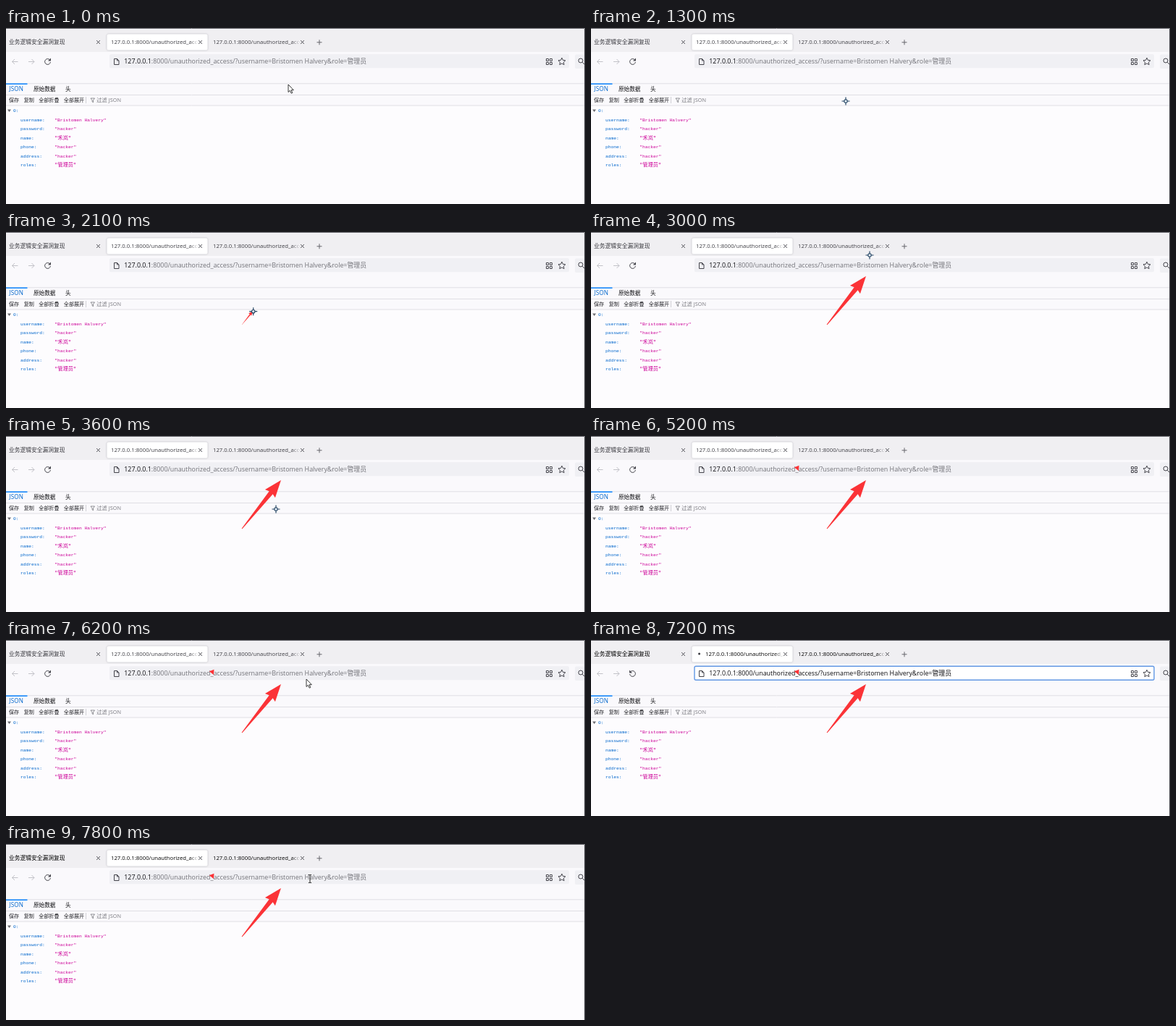
Animation, 800 px wide and 243 px high, one loop 8 s. Source, as an HTML page:

```html
<!DOCTYPE html>
<html lang="zh">
<head>
<meta charset="utf-8">
<style>
  html, body { margin: 0; width: 100%; height: 100%; overflow: hidden; background: #fdfcfe; }
  svg { display: block; width: 800px; height: 243px; }
  text { font-family: "Open Sans", "Noto Sans CJK SC", "Noto Sans CJK", sans-serif; white-space: pre; }
  .tab { font-size: 7.75px; }
  .url { font-size: 8.9px; }
  .tool { font-size: 7.1px; fill: #222226; }
  .json text { font: 6.25px "Liberation Mono", "Noto Sans CJK SC", "Noto Sans CJK", monospace; }
  .key { fill: #0066cc; }
  .value { fill: #cc0098; }
  .line { fill: none; stroke: #45454c; stroke-width: 1; }
</style>
</head>
<body>
<svg viewBox="0 0 800 243">
  <defs>
    <linearGradient id="fade">
      <stop offset=".9" stop-color="#fff"/><stop offset="1" stop-color="#fff" stop-opacity="0"/>
    </linearGradient>
    <mask id="clip1" maskUnits="userSpaceOnUse" x="142" y="8" width="124" height="22">
      <rect x="142" y="8" width="124" height="22" fill="url(#fade)"/>
    </mask>
    <mask id="clip2" maskUnits="userSpaceOnUse" x="283" y="8" width="124" height="22">
      <rect x="283" y="8" width="124" height="22" fill="url(#fade)"/>
    </mask>
    <path id="close" d="M-2.3-2.3 2.3 2.3M2.3-2.3-2.3 2.3" class="line"/>
    <filter id="shadow" x="-5%" y="-30%" width="110%" height="160%">
      <feDropShadow dx="0" dy="0" stdDeviation=".8" flood-color="#606070" flood-opacity=".5"/>
    </filter>
  </defs>

  <!-- tab strip -->
  <rect width="800" height="243" fill="#fdfcfe"/>
  <rect width="800" height="33" fill="#f0eff2"/>
  <rect y="33" width="800" height="44" fill="#faf9fc"/>
  <rect x="139.500" y="8.500" width="139" height="22" rx="2.500" fill="#fff" filter="url(#shadow)"/>
  <g id="tabs" class="tab">
    <text x="4" y="22.300">业务逻辑安全漏洞复现</text>
    <g mask="url(#clip1)"><text id="title" y="22.300">127.0.0.1:8000/unauthorized_access</text></g>
    <g mask="url(#clip2)"><text x="286" y="22.300">127.0.0.1:8000/unauthorized_access</text></g>
  </g>
  <circle id="busy" cy="19" r="1.500" fill="#3a3a40"/>
  <use href="#close" x="127.500" y="19.500"/>
  <use href="#close" x="268.500" y="19.500"/>
  <use href="#close" x="409.500" y="19.500"/>
  <path class="line" d="M429.500 19.800h7M433 16.300v7" style="stroke:#66666c"/>

  <!-- navigation bar -->
  <path class="line" style="stroke:#c2c2c8" d="M16.500 46.500h-8m3.500-3.500-3.500 3.500 3.500 3.500M31 46.500h8m-3.500-3.500 3.500 3.500-3.500 3.500"/>
  <g id="reload">
    <path class="line" d="M60.700 44.200A3.900 3.900 0 1 0 61.400 47"/>
    <path d="M62 41.500v4h-4z" fill="#45454c"/>
  </g>
  <rect id="bar" x="143" y="36.300" width="635" height="19" rx="2" stroke-width="1.400"/>
  <path class="line" d="M149.500 42.500h4l2.500 2.500v5.500h-6.500zM153.500 42.500v2.500h2.500"/>
  <rect id="selection" x="163" y="39.500" width="336" height="13.500" fill="#0078d7"/>
  <text class="url" x="163.300" y="49.200"><tspan id="host">127.0.0.1</tspan><tspan id="path">:8000/unauthorized_access/?username=Bristomen Halvery&amp;role=管理员</tspan></text>
  <path class="line" stroke-width="1.300" d="M746.500 42.500h3v3h-3zM751.500 42.500h3v3h-3zM746.500 47.500h3v3h-3zM751.500 47.500h3v3h-3z"/>
  <path class="line" stroke-linejoin="round" d="M768 41.200l1.500 3.200 3.500.4-2.600 2.400.7 3.500-3.100-1.800-3.100 1.800.7-3.500-2.600-2.400 3.500-.4z"/>
  <rect x="786" y="36.500" width="14" height="19.500" rx="2" fill="#f0f0f4"/>
  <g class="line"><circle cx="794" cy="45" r="3"/><path d="M796.300 47.300l3 3"/></g>

  <!-- viewer toolbars -->
  <rect y="77" width="800" height="30" fill="#faf9fc"/>
  <path d="M0 76.800H800M0 92.500H800M0 107H800" stroke="#e0dfe4"/>
  <rect y="76.500" width="29.500" height="1.500" fill="#0a84ff"/>
  <g font-size="7.600" fill="#0c0c0f">
    <text class="key" x="4.600" y="87.300" font-size="8.200">JSON</text>
    <text x="38" y="87.300">原始数据</text>
    <text x="82" y="87.300">头</text>
  </g>
  <g class="tool">
    <text x="3.900" y="102.200">保存</text>
    <text x="24.700" y="102.200">复制</text>
    <text x="45.200" y="102.200">全部折叠</text>
    <text x="79.800" y="102.200">全部展开</text>
    <text x="125.300" y="102.200" font-size="7.300" fill="#76767c">过滤 JSON</text>
  </g>
  <path d="M110.500 95v9" stroke="#d0d0d5"/>
  <path d="M117 97h5.500l-2 2.700v3l-1.500-1v-2z" fill="none" stroke="#76767c" stroke-width=".8"/>

  <g id="json" class="json">
    <path d="M2 112.500h5l-2.500 3.500z" fill="#6a6a70"/>
    <text class="key" x="10" y="116.300">0:</text>
  </g>
  <path d="M0 .5H799.500V243" fill="none" stroke="#5a5a60"/>

  <!-- annotations: the arrow is drawn along +x from tail to a tip at 86 -->
  <g fill="#fb3337">
    <path id="arrow" d="M0-.5 64-3.200 62-9 86 0 62 9 64 3.200 0 .5z"/>
    <path id="mark" d="M280.800 43.200 287.500 40.800 286.800 48z"/>
  </g>

  <g id="pointer">
    <path data-kind="arrow" d="M0 0V10.500L2.400 8.300 4.200 12.200 5.800 11.500 4.100 7.700H7.300z" fill="#fff" stroke="#222" stroke-width=".9"/>
    <g data-kind="cross" fill="none" stroke="#294866" stroke-width="1.200">
      <circle r="2.200" fill="#e8f2fa"/><path d="M-5.500 0h3.300M2.200 0h3.300M0-5.500v3.300M0 2.200v3.300"/>
    </g>
    <path data-kind="move" d="M0-7 2.800-4H1v3h3V-2.800L7 0 4 2.800V1H1v3h1.800L0 7-2.800 4H-1V1H-4v1.800L-7 0-4-2.800V-1h3V-4h-1.800z" fill="#fff" stroke="#222"/>
    <path data-kind="text" d="M-2-5.500H-.6L0-5 .6-5.500H2M0-5V5M-2 5.500H-.6L0 5 .6 5.500H2" fill="none" stroke="#222"/>
  </g>
</svg>
<script>
const LOOP = 8000, STEP = 100;
const $ = id => document.getElementById(id);
const show = (node, on) => node.setAttribute("display", on ? "inline" : "none");

const record = {
  username: "Bristomen Halvery", password: "hacker", name: "禾岚",
  phone: "hacker", address: "hacker", roles: "管理员"
};

function addText(parent, cls, x, y, content) {
  const node = document.createElementNS("http://www.w3.org/2000/svg", "text");
  node.setAttribute("class", cls);
  node.setAttribute("x", x);
  node.setAttribute("y", y);
  node.textContent = content;
  // Ideographs are wider than the Latin cells.
  if (/[\u4e00-\u9fff]/.test(content)) node.style.fontSize = "7.1px";
  parent.append(node);
}

Object.entries(record).forEach(([key, value], i) => {
  const y = 128.8 + i * 12.5;
  addText($("json"), "key", 20, y, key + ":");
  addText($("json"), "value", 67.3, y, `"${value}"`);
});

// Pointer path: [time, x, y]
const route = [
  [0, 390, 78], [100, 425, 105], [200, 510, 170], [300, 566, 214], [400, 519, 202],
  [900, 519, 202], [1000, 492, 187], [1300, 352, 101], [1800, 330, 134],
  [1900, 326, 128], [2600, 381, 64], [2700, 381, 64], [3000, 385, 32],
  [3200, 392, 36], [3600, 373, 101], [4100, 288, 48], [4200, 288, 48],
  [4300, 291, 51], [4500, 355, 100], [4800, 592, 226], [4900, 600, 260],
  [5800, 470, 260], [5900, 461, 180], [6200, 415, 54], [6400, 415, 54],
  [6500, 417, 54], [6600, 417, 54], [6800, 420, 48], [8000, 420, 48]
];
// Pointer shape from each time on
const shapes = [
  [0, "arrow"], [1000, "cross"], [4300, "move"], [4400, "cross"], [4800, "arrow"],
  [6500, "text"], [6800, "none"], [7500, "text"]
];

function pointerAt(t) {
  const i = Math.max(1, route.findIndex(p => p[0] >= t));
  const [t0, x0, y0] = route[i - 1], [t1, x1, y1] = route[i];
  const k = (t - t0) / (t1 - t0);
  return [x0 + (x1 - x0) * k, y0 + (y1 - y0) * k];
}

function drawPointer(t) {
  const [x, y] = pointerAt(t);
  const kind = shapes.filter(s => s[0] <= t).pop()[1];
  $("pointer").setAttribute("transform", `translate(${x} ${y})`);
  for (const node of $("pointer").children) show(node, node.dataset.kind === kind);
}

function drawArrow(t) {
  const k = Math.min(1, Math.max(0, (t - 1900) / 700));
  const angle = Math.atan2(-67, 54) * 180 / Math.PI;
  show($("arrow"), k > 0);
  $("arrow").setAttribute("transform", `translate(326 128) rotate(${angle}) scale(${k})`);
  show($("mark"), t >= 4000);
}

function drawBrowser(t) {
  const active = t >= 6500;
  const focused = active && t < 7500;
  const selected = active && t < 7000;
  const loading = t >= 7000 && t < 7500;
  const ink = selected ? "#fff" : "#0c0c10";
  $("tabs").setAttribute("fill", active ? "#000" : "#3c3c42");
  $("bar").setAttribute("fill", focused ? "#fff" : "#f0f0f4");
  $("bar").setAttribute("stroke", focused ? "#6298e4" : "none");
  $("host").setAttribute("fill", ink);
  $("path").setAttribute("fill", focused ? ink : "#727278");
  show($("selection"), selected);
  show($("busy"), loading);
  $("busy").setAttribute("cx", 151 - 3.5 * Math.sin((t - 7050) / 360));
  $("title").setAttribute("x", loading ? 158 : 145);
  // The reload icon turns the other way while a page loads.
  $("reload").setAttribute("transform", loading ? "translate(115 0) scale(-1 1)" : "");
}

function render(time) {
  const t = Math.floor((time % LOOP) / STEP) * STEP;
  drawBrowser(t);
  drawArrow(t);
  drawPointer(t);
}

function tick(now) {
  render(now);
  requestAnimationFrame(tick);
}
render(0);
requestAnimationFrame(tick);
</script>
</body>
</html>
```
